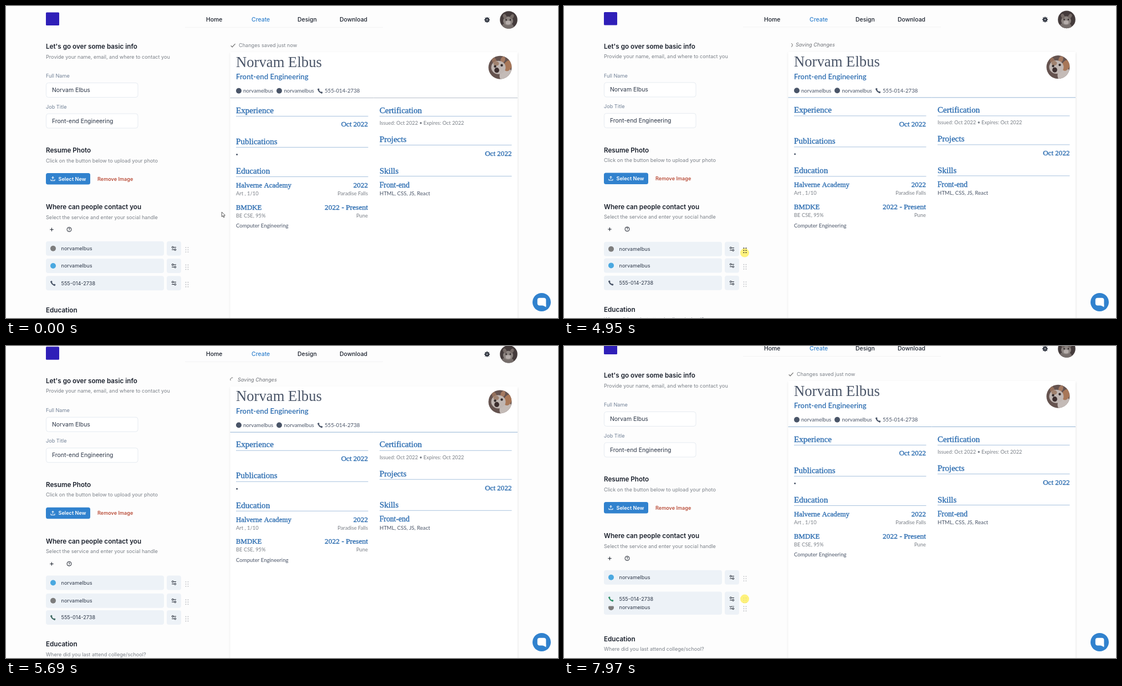
An HTML page with a canvas that plays this animation: 996 px wide and 562 px high, repeating every 8 s.

```html
<!DOCTYPE html>
<html lang="en">
<head>
<meta charset="utf-8">
<title>Resume editor</title>
<style>
  html, body { margin: 0; width: 100%; height: 100%; overflow: hidden; background: #fdfdfd; }
  canvas { display: block; width: 996px; height: 562px; }
</style>
</head>
<body>
<canvas id="stage"></canvas>
<script>
const W = 996, H = 562, LOOP = 8000, TAU = Math.PI * 2;
const canvas = document.getElementById('stage');
const ratio = window.devicePixelRatio || 1;
canvas.width = Math.round(W * ratio);
canvas.height = Math.round(H * ratio);
const c = canvas.getContext('2d');

const UI = 'Inter, sans-serif';
const BODY = 'Lato, sans-serif';
const SERIF = '"Liberation Serif", serif';
const SMALL = 9.13, MEDIUM = 10.45, LARGE = 11.68;
const INK = '#1a202c', SLATE = '#4a5568', GREY = '#7b8088', BLUE = '#2b6cb0', ACCENT = '#3182ce';
const NAME = 'Norvam Elbus', HANDLE = 'norvamelbus', PHONE = '555-014-2738';
const FIRST_ROW = 436.7, PITCH = 31.3;

// Motion helpers
const clamp = v => Math.max(0, Math.min(1, v));
const ramp = (t, a, b) => clamp((t - a) / (b - a));
const easeOut = u => 1 - (1 - u) ** 2;
const easeInOut = u => u * u * (3 - 2 * u);
const mix = (a, b, u) => a + (b - a) * u;
function track(t, keys) {
  for (let i = 1; i < keys.length; i++) {
    const [t0, v0] = keys[i - 1], [t1, v1] = keys[i];
    if (t <= t1) return mix(v0, v1, ramp(t, t0, t1));
  }
  return keys[keys.length - 1][1];
}

// Drawing helpers
function text(s, x, y, font, color, align = 'left') {
  c.font = font;
  c.fillStyle = color;
  c.textAlign = align;
  c.fillText(s, x, y);
}
const ui = (s, x, y, size, color, weight = 400) => text(s, x, y, `${weight} ${size}px ${UI}`, color);
const body = (s, x, y, size, color, align) => text(s, x, y, `${size}px ${BODY}`, color, align);
function serif(s, x, y, size, align) {
  text(s, x, y, `${size}px ${SERIF}`, BLUE, align);
  c.strokeStyle = BLUE;
  c.lineWidth = 0.35;
  c.strokeText(s, x, y);
}
function disc(x, y, r, color) {
  c.fillStyle = color;
  c.beginPath();
  c.arc(x, y, r, 0, TAU);
  c.fill();
}
function ring(x, y, r, color, width, from = 0, to = TAU) {
  c.strokeStyle = color;
  c.lineWidth = width;
  c.beginPath();
  c.arc(x, y, r, from, to);
  c.stroke();
}
function oval(x, y, rx, ry, color, turn = 0) {
  c.fillStyle = color;
  c.beginPath();
  c.ellipse(x, y, rx, ry, turn, 0, TAU);
  c.fill();
}
function box(x, y, w, h, r, fill, stroke) {
  c.beginPath();
  c.roundRect(x, y, w, h, r);
  if (fill) { c.fillStyle = fill; c.fill(); }
  if (stroke) { c.strokeStyle = stroke; c.lineWidth = 1; c.stroke(); }
}
function path(points, color, width) {
  c.strokeStyle = color;
  c.lineWidth = width;
  c.beginPath();
  points.forEach(([x, y], i) => i ? c.lineTo(x, y) : c.moveTo(x, y));
  c.stroke();
}
const rule = (x0, x1, y, color) => path([[x0, y], [x1, y]], color, 1);

function spokes(x, y, r, count, color, width, turn = 0) {
  for (let i = 0; i < count; i++) {
    const a = turn + i * TAU / count;
    path([[x, y], [x + r * Math.cos(a), y + r * Math.sin(a)]], color, width);
  }
}

function phone(x, y, color) {
  c.strokeStyle = color;
  c.lineWidth = 2.2;
  c.beginPath();
  c.moveTo(x - 3.6, y - 3.2);
  c.quadraticCurveTo(x - 2.6, y + 2.6, x + 3.2, y + 3.6);
  c.stroke();
  path([[x - 3.8, y - 3.8], [x - 2.6, y - 1.4]], color, 3);
  path([[x + 1.4, y + 2.6], [x + 3.8, y + 3.8]], color, 3);
}

function roundPhoto(x, y, r, paint) {
  c.save();
  c.beginPath();
  c.arc(x, y, r, 0, TAU);
  c.clip();
  c.translate(x, y);
  paint();
  c.restore();
}

function avatar() {
  disc(0, 0, 17, '#443b3b');
  oval(-2, 13, 11, 8, '#766e6b');
  oval(-1, 2, 9, 8, '#8c8480');
  oval(-7, -6, 3, 4.5, '#756a66', -0.4);
  oval(6, -6, 3, 4.5, '#756a66', 0.5);
  oval(-1, 5, 4.5, 3.5, '#b5adaa');
  disc(-4.5, 0, 1.4, '#332c2c');
  disc(3, 0, 1.4, '#332c2c');
}

function portrait() {
  disc(0, 0, 22, '#65534f');
  oval(12, 15, 13, 13, '#c4bbb7', 0.4);
  oval(14, -3, 7, 10, '#a87758', 0.4);
  oval(-10, -11, 4, 7, '#94705c', -0.4);
  oval(5, -14, 4, 6, '#a47a62', 0.4);
  oval(-3, 0, 13, 12, '#c0b6b2');
  oval(-7, -7, 5, 4, '#a0826f');
  disc(-9, -2, 2.2, '#332b2b');
  disc(3, -4, 2.2, '#332b2b');
  oval(-6, 5, 4.4, 4.6, '#3b2d2d');
}

function pointer(x, y) {
  const shape = [[0, 0], [0, 8.6], [2, 6.8], [3.3, 9.8], [4.8, 9.2], [3.5, 6.3], [6.1, 6.1]];
  c.beginPath();
  shape.forEach(([dx, dy]) => c.lineTo(x + dx, y + dy));
  c.closePath();
  c.fillStyle = '#fff';
  c.strokeStyle = '#444';
  c.lineWidth = 0.9;
  c.fill();
  c.stroke();
}

// Page parts
function navbar() {
  box(72, 11.5, 24, 23.5, 1.5, '#2f1fb8');
  rule(323, 680, 38.5, '#f3f3f4');
  [['Home', 361], ['Create', 443], ['Design', 526], ['Download', 602]].forEach(([s, x]) =>
    ui(s, x, 28.3, MEDIUM, s === 'Create' ? ACCENT : INK, 500));
  spokes(868, 25, 5, 8, INK, 1.7);
  disc(868, 25, 3.5, INK);
  disc(868, 25, 1.2, '#fdfdfd');
  spokes(868, 25, 3, 8, '#8b8f96', 0.4, TAU / 16);
  roundPhoto(907, 25, 15.8, avatar);
}

function section(title, note, y) {
  ui(title, 72, y + 4.2, LARGE, INK, 600);
  ui(note, 72, y + 21.6, SMALL, GREY);
}

function field(label, value, y) {
  ui(label, 72, y + 3.2, SMALL, '#718096');
  box(72.5, y + 12.5, 165.5, 26, 4, '#fff', '#e6ebf1');
  ui(value, 83, y + 29, MEDIUM, '#2d3748');
}

function form() {
  section("Let's go over some basic info", 'Provide your name, email, and where to contact you', 73);
  field('Full Name', NAME, 126);
  field('Job Title', 'Front-end Engineering', 181.5);

  section('Resume Photo', 'Click on the button below to upload your photo', 260);
  box(72, 301, 80, 20.6, 3.5, ACCENT);
  path([[81, 312], [81, 314.6], [88, 314.6], [88, 312]], '#fff', 1);
  path([[84.5, 312.5], [84.5, 307.5]], '#fff', 1);
  path([[82.3, 309.7], [84.5, 307.4], [86.7, 309.7]], '#fff', 1);
  ui('Select New', 94.5, 314.6, SMALL, '#fff', 600);
  ui('Remove Image', 165, 314.6, SMALL, '#b23a24', 500);

  section('Where can people contact you', 'Select the service and enter your social handle', 362);
  path([[79.3, 402.7], [85.7, 402.7]], INK, 1);
  path([[82.5, 399.5], [82.5, 405.9]], INK, 1);
  ring(114, 402.5, 4, INK, 1);
  text('?', 114, 405, `600 6.6px ${UI}`, INK, 'center');

  section('Education', 'Where did you last attend college/school?', 547.5);
}

function status(t) {
  const y = 71;
  const saving = (t >= 3600 && t < 5950) || (t >= 6410 && t < 6790);
  const saved = t < 50 || t >= 6790;
  if (saving) {
    const a = (t - 4950) / 460 * TAU;
    ring(408.5, y, 3.7, '#666', 1, a - 1.1, a + 1.1);
    text('Saving Changes', 418, y + 3.1, `italic ${SMALL}px ${UI}`, '#6d7076');
  } else if (saved) {
    path([[405.7, y + 0.3], [408.2, y + 2.9], [413.6, y - 2.8]], '#666', 1.1);
    ui('Changes saved just now', 420, y + 3.1, SMALL, GREY);
  } else {
    spokes(409.5, y, 5, 6, '#70747a', 1.7, TAU / 12);
    ui('Unsaved Changes', 420, y + 3.1, SMALL, GREY);
  }
}

function heading(s, x, y, line) {
  serif(s, x, y, 15.1);
  rule(x, x + 238.5, line, '#a8c2de');
}

function resume(t) {
  c.save();
  c.shadowColor = 'rgba(0,0,0,.12)';
  c.shadowBlur = 4 * ratio;
  c.shadowOffsetY = 2 * ratio;
  c.fillStyle = '#fff';
  c.fillRect(404.5, 83, 518.5, 620);
  c.restore();

  text(NAME, 415, 109.5, `26.7px ${SERIF}`, SLATE);
  text('Front-end Engineering', 415, 132.4, `600 13.25px ${BODY}`, BLUE);
  roundPhoto(891.5, 110.7, 21, portrait);

  disc(420, 152.8, 5, SLATE);
  disc(493, 152.8, 5, SLATE);
  phone(567, 152.8, SLATE);
  body(HANDLE, 428, 156.2, 9.65, SLATE);
  body(HANDLE, 501.5, 156.2, 9.65, SLATE);
  body(PHONE, 575, 156.2, 9.7, SLATE);
  rule(404.5, 923, 165.5, t < 4420 ? '#b7c0ca' : '#94b4d4');

  heading('Experience', 415, 192.5, 198.5);
  serif('Oct 2022', 653, 217.2, 13.1, 'right');
  heading('Publications', 415, 248.7, 254.5);
  disc(416.7, 267.4, 1.5, SLATE);
  heading('Education', 415, 302, 307.5);
  serif('Halverne Academy', 415, 326.8, 12.9);
  serif('2022', 653, 326.8, 13.1, 'right');
  body('Art , 1/10', 415, 340.8, 9.4, GREY);
  body('Paradise Falls', 653, 340.8, 9.4, GREY, 'right');
  serif('BMDKE', 415, 366.6, 12.8);
  serif('2022 - Present', 653, 366.6, 13.5, 'right');
  body('BE CSE, 95%', 415, 380.6, 9.4, GREY);
  body('Pune', 653, 380.6, 9.4, GREY, 'right');
  body('Computer Engineering', 415, 399.4, 9.6, SLATE);

  heading('Certification', 674, 192.5, 198.5);
  body('Issued: Oct 2022 • Expires: Oct 2022', 674, 213.9, 9.25, GREY);
  heading('Projects', 674, 245, 250.5);
  serif('Oct 2022', 912.5, 269.8, 13.1, 'right');
  heading('Skills', 674, 301.5, 306.5);
  serif('Front-end', 674, 326.5, 13.7);
  body('HTML, CSS, JS, React', 674, 340.8, 9.7, SLATE);
}

function grip(y, color) {
  for (const dx of [-2, 2])
    for (const dy of [-4, 0, 4]) disc(326.5 + dx, y + 2.4 + dy, 0.95, color);
}

function row(y, value, icon) {
  box(72, y - 13, 213, 26, 4, '#edf2f7');
  box(290, y - 13, 26, 26, 4, '#edf2f7');
  icon(85, y);
  ui(value, 99.5, y + 3.2, SMALL, '#2d3748');
  ring(300.8, y - 2, 1.5, INK, 1);
  path([[302.3, y - 2], [307, y - 2]], INK, 1);
  path([[299.2, y + 2.2], [303.6, y + 2.2]], INK, 1);
  ring(305.2, y + 2.2, 1.5, INK, 1);
  grip(y, '#b9bcc1');
}

function contacts(t, scroll, hand) {
  const slot = i => FIRST_ROW + PITCH * i - scroll;
  const birdY = slot(1 - easeOut(ramp(t, 5240, 5470)));
  let gitY = slot(0), phoneY = slot(2);
  if (t >= 4420) gitY = hand - 6.8;
  if (t >= 5650) gitY = mix(hand - 6.8, slot(1), easeOut(ramp(t, 5650, 5930)));
  if (t >= 5950) gitY = slot(1 + easeOut(ramp(t, 7860, 8090)));
  if (t >= 7550) phoneY = hand;

  row(birdY, HANDLE, (x, y) => disc(x, y, 5, '#4aa8e0'));
  row(gitY, HANDLE, (x, y) => disc(x, y, 5, '#7d7d7d'));
  const tone = t < 5250 ? SLATE : t < 7680 ? '#3f6a62' : '#2f8f68';
  row(phoneY, PHONE, (x, y) => phone(x, y, tone));

  if ((t >= 4100 && t < 5650) || t >= 7550) disc(326, hand, 8, 'rgba(253,238,80,.74)');
  const dark = u => `rgba(30,30,36,${u})`;
  if (t < 5230) grip(gitY, dark(ramp(t, 2080, 2280)));
  else if (t > 6600 && t < 7680) grip(phoneY, dark(ramp(t, 6640, 6820)));
}

function chat() {
  disc(966.5, 533.5, 16.5, ACCENT);
  box(958.8, 525.7, 15.6, 13.8, [4, 4, 0, 4], '#fff');
  c.beginPath();
  c.moveTo(968, 539.4);
  c.quadraticCurveTo(971, 540, 974.4, 542.6);
  c.lineTo(974.4, 538);
  c.fill();
}

function cursor(t) {
  if (t < 2080) {
    const u = easeInOut(ramp(t, 1120, 1930));
    pointer(mix(389.3, 328.8, u), mix(371, 423.5, u));
  } else if (t >= 5930 && t < 6640) {
    const u = easeInOut(ramp(t, 6410, 6640));
    pointer(mix(327, 326, u), mix(466, 478, u));
  }
}

function draw(t) {
  const scroll = track(t, [[4880, 0], [4950, 0.6], [5210, 4.5], [5420, 6.3], [6020, 15],
    [7550, 15], [7620, 16], [7970, 20]]);
  const hand = t < 7000
    ? track(t, [[4420, 443.5], [4950, 444.5], [5210, 453], [5420, 464], [5600, 466]])
    : track(t, [[7550, 483], [7620, 478], [7970, 455.6]]);

  c.setTransform(ratio, 0, 0, ratio, 0, 0);
  c.fillStyle = '#fdfdfd';
  c.fillRect(0, 0, W, H);
  c.save();
  c.translate(0, -scroll);
  navbar();
  form();
  status(t);
  resume(t);
  c.restore();
  contacts(t, scroll, hand);
  chat();
  cursor(t);
}

const start = performance.now();
function tick() {
  draw((performance.now() - start) % LOOP);
  requestAnimationFrame(tick);
}
tick();
</script>
</body>
</html>
```
